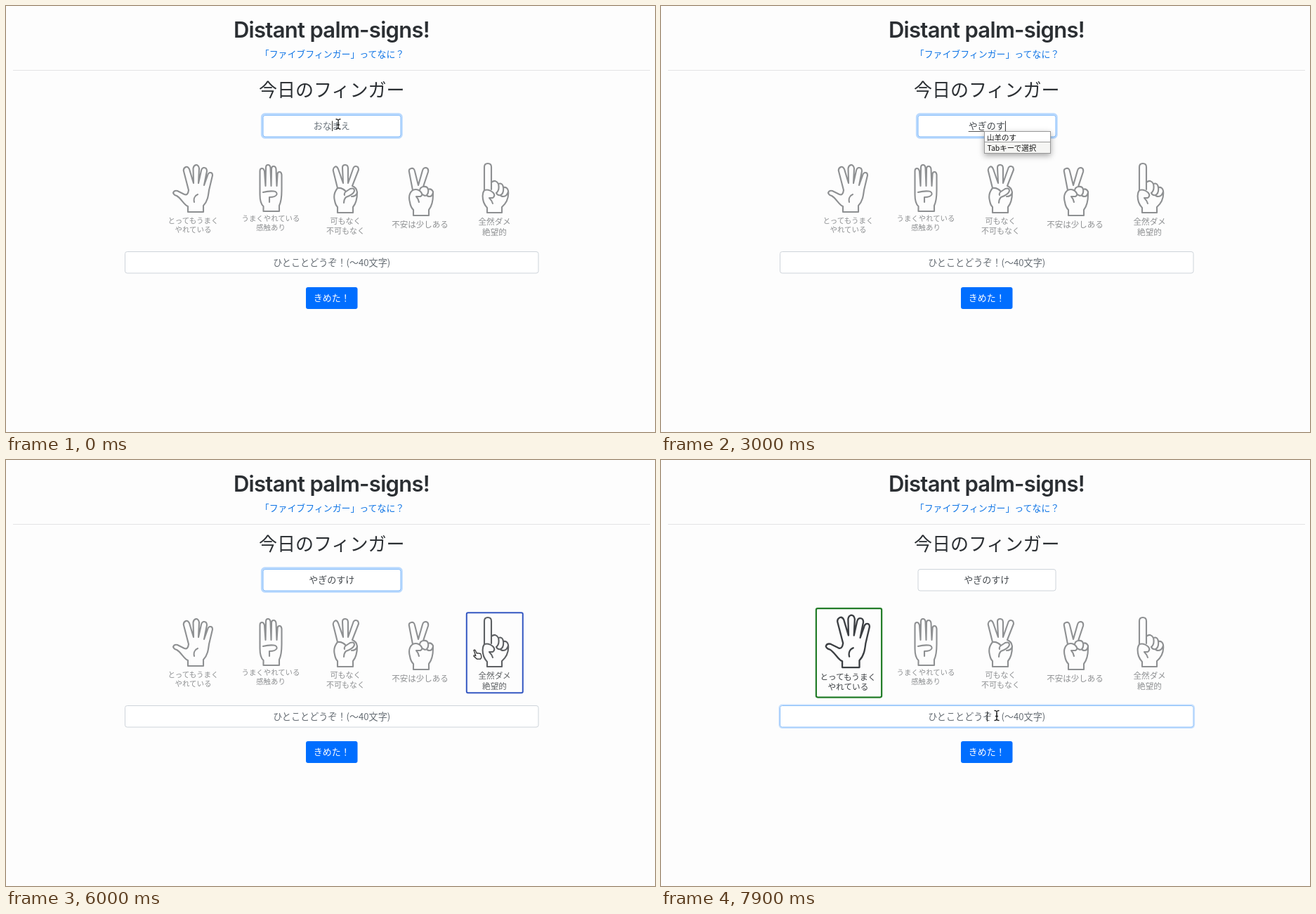
Recreate the animation shown at these times as an HTML page. Size 924 px wide and 606 px high, loop 8000 ms.

```html
<!DOCTYPE html>
<html lang="ja">
<head>
<meta charset="utf-8">
<style>
html, body { margin: 0; width: 100%; height: 100%; overflow: hidden; background: #fdfdfd; }
svg { display: block; width: 100vw; height: 100vh; font: 500 13px 'Noto Sans CJK JP', 'Noto Sans CJK', sans-serif; }
.mid { text-anchor: middle; }
.title { font: 560 31px Inter, sans-serif; letter-spacing: -.7px; fill: #2b2f33; }
.field { fill: #fff; stroke: #ced4da; }
.ring { fill: none; stroke: #0a7bff; }
.hand { fill: none; stroke: #212529; stroke-width: 2.1; stroke-linecap: round; stroke-linejoin: round; }
.card text { fill: #212529; }
.frame { fill: none; stroke-width: 2; }
.ime { filter: drop-shadow(0 3px 4px rgba(0, 0, 0, .35)); }
.ime text { font-size: 10.5px; fill: #111; }
.ime .note { font-size: 9px; fill: #999; text-anchor: end; }
#pointer path { stroke: #222; stroke-linejoin: round; stroke-linecap: round; fill: #fff; }
</style>
</head>
<body>
<svg viewBox="0 0 924 606" preserveAspectRatio="none">
  <rect width="924" height="606" fill="#fdfdfd"/>
  <text class="mid title" x="463.5" y="44.5">Distant palm-signs!</text>
  <text class="mid" x="464.5" y="72.5" font-size="12.9" fill="#0f75e6">「ファイブフィンガー」ってなに？</text>
  <path d="M10 91.5H917" stroke="#e4e4e5"/>
  <text class="mid" x="463.7" y="128.9" font-size="26" font-weight="400" fill="#2b2f33">今日のフィンガー</text>

  <rect id="nameRing" class="ring" x="364.5" y="153.9" width="198.6" height="33.2" rx="4"/>
  <rect id="nameField" class="field" x="366" y="155.5" width="196" height="30.5" rx="3"/>
  <text id="nameText" class="mid" x="463.7" y="175"></text>
  <path id="underline" stroke="#555"/>

  <g id="cards"></g>

  <rect id="noteRing" class="ring" x="168.3" y="348.3" width="591" height="32.8" rx="4"/>
  <rect id="noteField" class="field" x="169.5" y="349.5" width="588.5" height="30.5" rx="3"/>
  <text class="mid" x="463.7" y="369.7" font-size="13.1" fill="#666d74">ひとことどうぞ！(〜40文字)</text>

  <rect x="427" y="400" width="73.5" height="31" rx="3" fill="#006eff"/>
  <text class="mid" x="463.7" y="420" fill="#fff">きめた！</text>

  <path id="caret" stroke="#333"/>
  <g id="ime" class="ime"></g>
  <g id="pointer"></g>
</svg>
<script>
const $ = id => document.getElementById(id);
const LOOP = 8000, STEP = 100;

const cards = [
  { x: 225.5, w: 84, mid: 266.5, size: 10.5, lines: [['とってもうまく', 305], ['やれている', 318]],
    hand: `M259 293H281V284C287 278 288 270 289 262L294 241Q294 237 291 237Q288 237 287 241L282 255L286 235Q286 230 282 230
      Q279 230 278 234L274 252L275 231Q274 226 270.5 226Q267 227 266.500 231L267 252L261 232Q259 228 256 229Q252 231 253 235
      L260 262Q259 270 254 268L244 263Q239 262 238 266Q239 269 243 270C250 274 253 283 259 285ZM273 268C268 270 267 275 268 279` },
  { x: 332, w: 90, mid: 377, size: 10.4, lines: [['うまくやれている', 302.5], ['感触あり', 315.5]],
    hand: `M366.500 292H389V284C392 278 392.500 270 392.500 262V240Q392 236 389.5 236Q386.500 236 386.500 240L385.500 256L384.500 232
      Q384 228 381 228Q378 228 378 232L377.500 256L376.500 230Q376 226 373 226Q370 226 370 230L369.500 256L368 235
      Q367 231 364.500 231Q361.500 231 361.500 235V268C361.500 276 363 282 366.500 285ZM366 265Q373 263 381 263.500
      Q386 264 385.500 268Q384 272 375 272V279` },
  { x: 445.5, w: 77, mid: 483.5, size: 11, lines: [['可もなく', 306.5], ['不可もなく', 320]],
    hand: `M472 294H494V286C499 280 500 274 500 265Q499 258 493 256L502 233Q502 228 498 228Q495 228 494 232L487 252V231
      Q487 226 483 226Q479 226 479 230L480 252L473 232Q471 227 468 229Q465 231 466 235L472 259C468 264 466 270 468 277
      Q469 283 472 286ZM472 259Q479 258 484 264L490 260Q496 258 496 263Q495 268 484 272Q481 275 481 280M484 264Q481 266 482 269M500 265Q499 271 492 271` },
  { x: 545, w: 90, mid: 589.5, size: 11.5, lines: [['不安は少しある', 310.5]],
    hand: `M580 298H602V290C606 285 608 278 608 268V264Q605 259 601 261Q600 256 594 257L601 236Q602 231 598 230
      Q594 230 593 234L587 255L582 235Q581 230 577 231Q573 232 574 236L579 262C574 266 573 272 575 279Q576 286 580 290Z
      M579 262Q586 259 591 265Q594 269 590 271H584Q587 274 588 279M594 257Q589 258 589 263M601 261Q602 266 599 269
      Q596 271 593 268M608 265Q607 271 603 271Q600 271 599 269` },
  { x: 655.8, w: 80, mid: 695.5, size: 11.6, lines: [['全然ダメ', 307], ['絶望的', 321.5]],
    hand: `M685 294H706V286C713 280 716 272 715 263Q714 257 708 258Q707 251 701 253Q697 246 691 251V229Q691 224 686 224
      Q681 224 681 229V262C678 266 678 272 680 279Q682 284 685 287ZM681 262Q688 260 694 266Q697 270 693 273H688
      Q692 277 693 281M691 251V261M701 253Q703 262 698 266M708 258Q709 267 704 269Q700 270 698 266M715 264Q713 271 708 271Q705 271 704 269` }
];
const TOP = 217.3, HEIGHT = 114;

$('cards').innerHTML = cards.map(c => `<g class="card">
  <rect class="frame" x="${c.x}" y="${TOP}" width="${c.w}" height="${HEIGHT}" rx="2"/>
  <g class="ink"><path class="hand" d="${c.hand}"/>${c.lines.map(([s, y]) =>
    `<text class="mid" x="${c.mid}" y="${y + c.size * .36}" font-size="${c.size}">${s}</text>`).join('')}</g></g>`).join('');
const cardNodes = [...document.querySelectorAll('.card')];

// start time, composed text, candidates, popup width
const typing = [
  [1700, 'y', [], 94],
  [1800, 'y', ['や', 'ユーザ名', 'やる'], 94],
  [1900, 'や', ['や', '山', 'やる'], 94],
  [2100, 'やg', ['やぎ', 'やがて', 'やぐら'], 94],
  [2300, 'やぎ', ['山羊', 'やぎ', '山羊のミルクの'], 118],
  [2500, 'やぎn', ['山羊の', '山羊に', 'やぎに'], 118],
  [2700, 'やぎの', ['山羊の', 'やぎの'], 118],
  [2900, 'やぎのs', ['山羊のs'], 118],
  [3000, 'やぎのす', ['山羊のす'], 94],
  [3200, 'やぎのすけ', ['山羊のすけ'], 94]
];
const COMMIT = 3300, CLICK = 7200, PICK = 7300, NOTE = 7900;
const caretOn = [[0, 400], [1000, 1500], [1700, 3800], [4300, 4800], [5300, 5800], [6300, 6800], [NOTE, LOOP]];
const route = [[5200, 483, 267], [5300, 488, 268], [5900, 668, 276], [6000, 671, 276.5], [6200, 688, 277],
  [6900, 300, 272], [7200, 293, 273], [7500, 293, 273], [7900, 478, 363.5]];

const shapes = {
  beam: '<path style="fill:none" d="M-3-7Q0-7 0-4.500V4.500Q0 7-3 7M3-7Q0-7 0-4.500M0 4.500Q0 7 3 7M-1.500 1H1.500" stroke-width="1.3"/>',
  hand: '<path d="M-5-6q1.500-1 2.300.6l1.900 4q1-1 2 0q1-.8 2 .3q1.300-.6 1.800.8l.8 3.500q0 2-1.200 3.500h-5l-4.500-4q-.7-1.800 1.500-1.200l1.300.7Z" stroke-width="1.200"/>',
  arrow: '<path style="fill:#111;stroke:#fff" d="M-3-6V6L0 3.500L2 8L4 7L2 3H6Z" stroke-width=".8"/>'
};

function pointerAt(t) {
  if (t < 1700) return [473, 168];
  if (t < route[0][0]) return null;
  const i = route.findIndex(p => p[0] >= t);
  if (i <= 0) return route[0].slice(1);
  const [t0, x0, y0] = route[i - 1], [t1, x1, y1] = route[i];
  const u = (t - t0) / (t1 - t0), k = u * u * (3 - 2 * u);
  return [x0 + (x1 - x0) * k, y0 + (y1 - y0) * k];
}

function popup(words, width, first) {
  if (!words.length) return '';
  const x = 460.5, y = 178.5, h = words.length * 15 + 1, edge = first ? '#b5764e' : '#999';
  return `<rect x="${x}" y="${y}" width="${width}" height="${h + 15}" fill="#fff" stroke="#999"/>
    <rect x="${x + .5}" y="${y + h - 1}" width="${width - 1}" height="15.5" fill="#f5f5f3"/>
    <path d="M${x} ${y + h - 1}h${width}" stroke="${edge}"/>
    ${words.map((w, i) => `<text x="464" y="${y + 12 + i * 14.6}">${w}</text>`).join('')}
    ${first ? `<text class="note" x="548" y="${y + 41}">ひらがな</text>` : ''}
    <text x="464.5" y="${y + h + 11.5}">Tabキーで選択</text>`;
}

function setFocus(id, amount, width) {
  $(id + 'Ring').style.cssText = `opacity:${.28 * amount};stroke-width:${width}`;
  $(id + 'Field').style.stroke = amount ? '#86bdfa' : '#ced4da';
}

function draw(t) {
  const composing = t >= 1700 && t < COMMIT;
  const state = typing.filter(s => s[0] <= t).pop();
  const name = $('nameText');
  name.textContent = !state ? 'おなまえ' : composing ? state[1] : 'やぎのすけ';
  name.style.fill = state ? '#43484d' : '#6c757d';
  const half = name.getComputedTextLength() / 2, end = 463.7 + half;
  $('underline').setAttribute('d', composing ? `M${463.7 - half} 178.500H${end}` : '');
  $('ime').innerHTML = composing ? popup(state[2], state[3], state[0] === 1800) : '';

  setFocus('name', t < CLICK ? 1 : t < PICK ? .65 : 0, t < CLICK ? 3.2 : 2.2);
  setFocus('note', t >= NOTE ? .8 : 0, 1.6);

  const visible = caretOn.some(([a, b]) => t >= a && t < b);
  const caretX = t >= NOTE || !state ? 464.5 : end + .7, caretY = t >= NOTE ? 357.5 : 163.5;
  $('caret').setAttribute('d', visible ? `M${caretX} ${caretY}v14.500` : '');

  const pos = pointerAt(t);
  const inside = (x, y, w, h) => pos && pos[0] >= x && pos[0] <= x + w && pos[1] >= y && pos[1] <= y + h;
  let overCard = false;
  cards.forEach((c, i) => {
    const hover = inside(c.x, TOP, c.w, HEIGHT), picked = i === 0 && t >= PICK;
    overCard = overCard || hover;
    const node = cardNodes[i];
    node.querySelector('.frame').style.stroke = picked ? '#237d29' : hover ? '#3558c2' : 'none';
    node.querySelector('.ink').style.opacity = picked ? .88 : hover ? .72 : .5;
    node.setAttribute('transform', picked ? 'translate(267.400 274.300) scale(1.11) translate(-267.400 -274.300)' : '');
  });

  const overField = inside(366, 155, 196, 31) || inside(169, 349, 589, 31);
  $('pointer').innerHTML = pos ? shapes[overCard ? 'hand' : overField ? 'beam' : 'arrow'] : '';
  if (pos) $('pointer').setAttribute('transform', `translate(${pos[0]} ${pos[1]})`);
}

const start = performance.now();
let shown = -1;
function tick() {
  const t = Math.floor((performance.now() - start) % LOOP / STEP) * STEP;
  if (t !== shown) draw(shown = t);
  requestAnimationFrame(tick);
}
tick();
</script>
</body>
</html>
```
